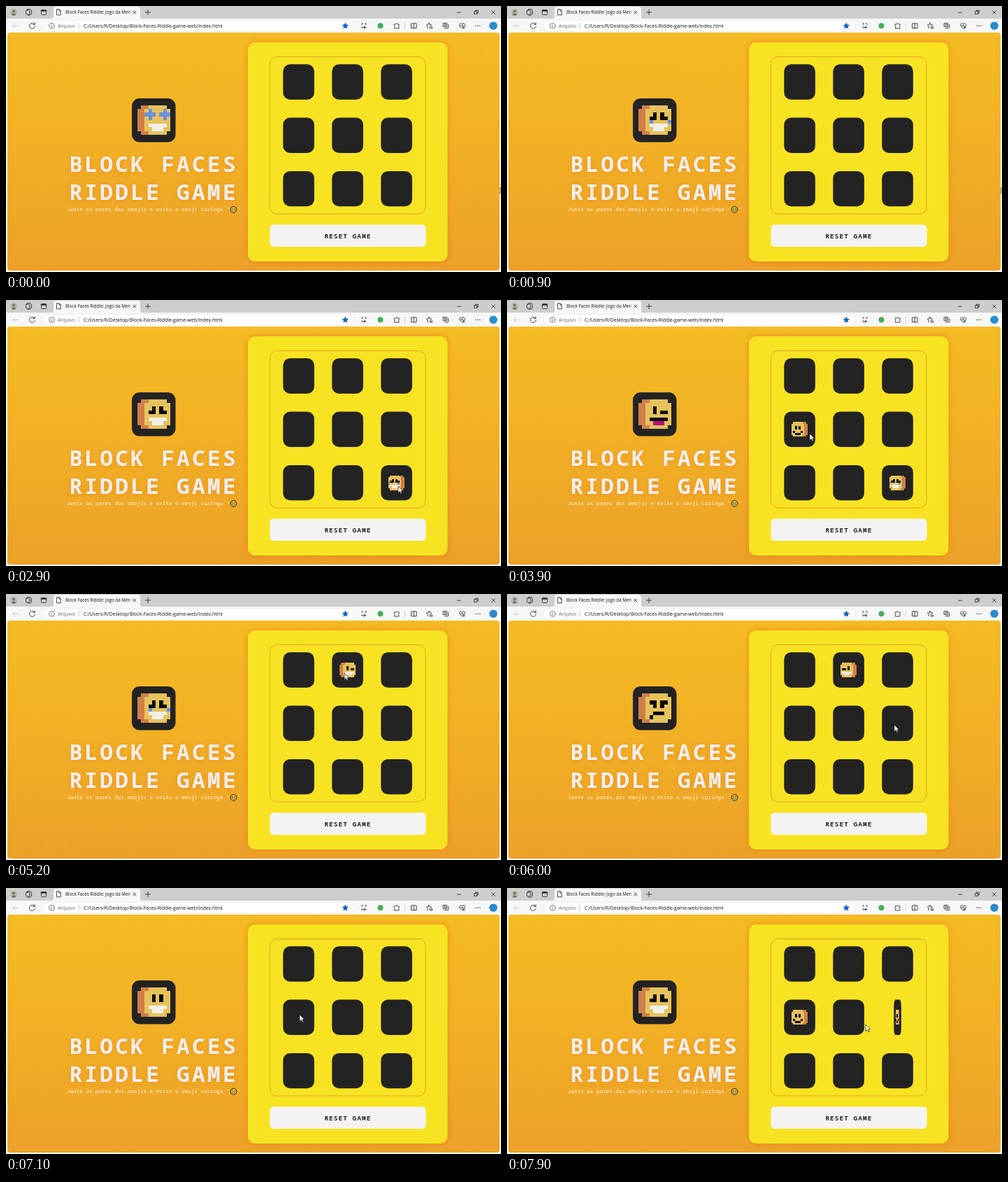
An HTML page for the animation above (8000 ms loop, 708 px wide and 380 px high).

```html
<!DOCTYPE html>
<html lang="pt">
<head>
<meta charset="utf-8">
<title>Block Faces Riddle</title>
<style>
html, body { margin: 0; width: 100%; height: 100%; overflow: hidden; background: #ececec; }
svg { display: block; width: 100vw; height: 100vh; }
.ui { font-family: "Open Sans", "Noto Sans", sans-serif; white-space: pre; }
.mono { font-family: "Noto Sans Mono", "DejaVu Sans Mono", monospace; white-space: pre; }
.title { font-size: 31px; font-weight: 600; letter-spacing: 3.36px; fill: #f3f0ec; }
.icon { fill: none; stroke: #333; stroke-width: .9; stroke-linecap: round; stroke-linejoin: round; }
</style>
</head>
<body>
<svg viewBox="0 0 708 380" xmlns="http://www.w3.org/2000/svg">
  <defs>
    <linearGradient id="sky" x1="0" y1="0" x2="0" y2="1">
      <stop offset="0" stop-color="#f4bb23"/>
      <stop offset=".45" stop-color="#f2b125"/>
      <stop offset="1" stop-color="#eca028"/>
    </linearGradient>
    <filter id="glow" x="-10%" y="-10%" width="120%" height="120%">
      <feDropShadow dx="0" dy="0" stdDeviation="4" flood-color="#ee7a1c" flood-opacity=".8"/>
    </filter>
    <filter id="soft" x="-10%" y="-30%" width="120%" height="160%">
      <feDropShadow dx="0" dy="1" stdDeviation="3" flood-color="#ea801e" flood-opacity=".6"/>
    </filter>
    <clipPath id="tabClip"><rect x="84" y="2" width="93.5" height="15"/></clipPath>
  </defs>

  <!-- browser frame -->
  <rect width="708" height="380" fill="#f7f7f7"/>
  <rect width="708" height="18" fill="#cdcdcd"/>
  <path d="M65 18q3 0 3-3V5q0-4 4-4h116q4 0 4 4v10q0 3 3 3z" fill="#f7f7f7"/>
  <circle cx="11" cy="9" r="5" fill="#b9b5a9"/>
  <circle cx="11" cy="7.4" r="1.9" fill="#77736a"/>
  <path d="M7.6 12.5q3.4-4.6 6.8 0q-3.4 2.4-6.8 0z" fill="#77736a"/>
  <g class="icon">
    <rect x="28.5" y="6" width="5.5" height="6" rx="1"/>
    <path d="M30.5 6V4.6h4.5l1.4 2v5L34 13.2h-3"/>
    <rect x="50.5" y="5.5" width="7" height="7" rx="1"/><path d="M50.5 6.7h7" stroke-width="2"/>
    <path d="M72.8 4.8h3.4l2 2v6h-5.4zM76 5v2h2"/>
    <path d="M181.8 7l4 4m0-4l-4 4M199.5 9h7m-3.5-3.5v7"/>
    <path d="M645.5 9.2h5M670 7.6h3.8v3.8H670zM671.5 7.3V6.2h3.8V10h-1.2M694.7 6.8l4.6 4.6m0-4.6l-4.6 4.6"/>
  </g>
  <text class="ui" x="85" y="11.4" font-size="6.3" fill="#111" clip-path="url(#tabClip)">Block Faces Riddle: Jogo da Memória</text>

  <rect x="52" y="20.2" width="446" height="16" rx="8" fill="#fff" stroke="#e2e2e2" stroke-width=".7"/>
  <path class="icon" d="M10 28.3h7.5M13 25.2l-3.1 3.1 3.1 3.1" style="stroke:#c9c9c9"/>
  <g class="icon">
    <path d="M40.9 26.1a4 4 0 1 0 .6 3M41.2 23.8v2.6h-2.6"/>
    <g style="stroke:#666"><circle cx="65.3" cy="28.3" r="3.8"/><path d="M65.3 28v2.2m0-4v.1"/></g>
    <path d="M104 24.5v7.5" style="stroke:#bbb"/>
    <path d="M509 26.5V25h1.5m3 0h1.5v1.5M509 29.5V31h1.5M513 28.5v4m-2-2h4"/>
    <path d="M555.5 26h2.2q.9-3 2.4 0h2v2.2q-2 .9 0 2.2v1.6h-6.6v-2q2-.8 0-2z"/>
    <path d="M570.5 23.5v9" style="stroke:#ccc"/>
    <path d="M582.2 25h-2.7v6.5h2.7M584.4 25h2.7v6.5h-2.7M583.3 24v8.6"/>
    <path d="M605 24.4l1.1 2.4 2.6.3-1.9 1.8M603.2 31.2l-.5.3.5-2.6-1.9-1.8 2.6-.3 1.1-2.4M606 30h4m-4 1.8h4"/>
    <path d="M625.5 24.5h5v5h-5zM627.3 31.6h5.3v-5.2M628 25.8v2.4m-1.2-1.2h2.4"/>
    <path d="M652.5 32l-3.6-3.6q-1.2-2.5 1-3.5 1.6-.5 2.6 1 1.2-1.5 2.8-1 2.2 1 .9 3.5zM650 28.3h1.8l.8-1.4 1 2.4h1.7"/>
    <path d="M672 28.3h.1m2.8 0h.1m2.8 0h.1" stroke-width="1.4"/>
  </g>
  <path d="M485.3 23.5l1.5 3 3.2.4-2.4 2.3.7 3.3-3-1.6-3 1.6.7-3.3-2.4-2.3 3.2-.4z" fill="#1364c4"/>
  <circle cx="535.5" cy="28.2" r="4" fill="#45ad5a"/>
  <circle cx="654.6" cy="30.8" r="1.8" fill="#3d9a4c"/>
  <circle cx="697" cy="28.2" r="5.8" fill="#2b8ccb"/>
  <g class="ui" font-size="6.95">
    <text x="74" y="30.8" fill="#666">Arquivo</text>
    <text x="111" y="30.8" fill="#111">C:/Users/R/Desktop/Block-Faces-Riddle-game-web/index.html</text>
  </g>

  <!-- page -->
  <rect x="2" y="38" width="704" height="340" rx="4" fill="url(#sky)"/>
  <rect x="180" y="132" width="62.5" height="62.5" rx="11" fill="#232323"/>
  <g id="hero" transform="translate(188 142) scale(5.23)"></g>
  <g class="mono title" filter="url(#soft)">
    <text x="90.4" y="237">BLOCK FACES</text>
    <text x="90.4" y="277">RIDDLE GAME</text>
  </g>
  <g class="mono" font-size="7.2" font-weight="500" letter-spacing=".25" fill="#fdf4e2">
    <text x="87" y="293.3">Junte os pares dos emojis e evite o emoji curinga "</text>
    <text x="331.3" y="293.3">"</text>
  </g>
  <circle cx="325.5" cy="290.8" r="4.4" fill="#f3c93a" stroke="#2a2418" stroke-width="1"/>
  <path d="M323.8 288.4v1.4m3.4-1.4v1.4" stroke="#2a2418" stroke-width="1.1"/>
  <path d="M322.8 291.2h5.4q-2.7 4.6-5.4 0z" fill="#fff" stroke="#2a2418" stroke-width=".7"/>

  <rect x="346" y="52" width="285.5" height="313" rx="10" fill="#f7e321" filter="url(#glow)"/>
  <rect x="377.5" y="72.5" width="222.5" height="224.5" rx="10" fill="none" stroke="#eda01f"/>
  <g id="board"></g>
  <rect x="377.5" y="312.5" width="223" height="31.5" rx="5" fill="#f3f3f3"/>
  <text class="mono" x="455.4" y="331.8" font-size="9.5" font-weight="600" letter-spacing="1" fill="#222">RESET GAME</text>
  <path id="cursor" d="M0 0V9.4L2.2 7.4 3.8 10.8 5.3 10.1 3.8 6.8H6.7Z" fill="#fff" stroke="#222" stroke-width=".7"/>
</svg>

<script>
const LOOP = 8000, STEP = 100, FLIP = 300;
const $ = id => document.getElementById(id);

// Each mark is a column and row on the 9 by 8 face.
const BLACK = '#0c0a08', WHITE = '#f1efea', BLUE = '#6b90de', PINK = '#b80f86';
const TEETH = '35 45 55 65 75 46 56 66';
const EYES = '42 43 62 63', WINK = '42 43 63 73', ARCHED = '42 33 43 62 63 73';
const FACES = {
  star: { [BLUE]: '31 22 32 42 33 71 62 72 82 73', [WHITE]: TEETH },
  grin: { [BLACK]: EYES, [WHITE]: TEETH },
  wink: { [BLACK]: WINK, [WHITE]: TEETH },
  arch: { [BLACK]: ARCHED, [WHITE]: TEETH },
  cry: { [BLACK]: ARCHED, [BLUE]: '34 84', [WHITE]: TEETH },
  smile: { [BLACK]: EYES + ' 35 75 46 56 66' },
  tongue: { [BLACK]: WINK + ' 35 45 55 65 75', [PINK]: '46 56 66' },
  doubt: { [BLACK]: '32 42 43 62 72 63 45 55 65 36' }
};
const MOODS = ('star grin cry star smile wink arch smile tongue ' +
  'grin cry smile doubt star grin wink arch').split(' ');

// column, row, face, opening time, closing time
const TURNS = [
  [2, 2, 'cry', 2600, 4200],
  [0, 1, 'smile', 3650, 4200],
  [1, 0, 'wink', 5200, 6700],
  [2, 1, 'smile', 6050, 6700],
  [0, 1, 'smile', 7250, 9000],
  [2, 1, 'smile', 7800, 9000]
];

// time, x, y
const MOVES = [
  [0, 707, 259], [1600, 707, 259], [2000, 588, 290], [2400, 561, 266],
  [2900, 561, 266], [3400, 433, 191], [4500, 433, 191], [5000, 484, 113],
  [5200, 484, 113], [5500, 554, 187], [6600, 554, 187], [7050, 420, 181],
  [7200, 420, 181], [7600, 547, 190], [7700, 547, 190], [7900, 513, 195]
];

const cells = marks => marks.split(' ').map(([x, y]) => `M${x} ${y}h1v1h-1z`).join('');

function faceMarkup(name) {
  const marks = Object.entries(FACES[name])
    .map(([color, list]) => `<path fill="${color}" d="${cells(list)}"/>`).join('');
  return '<g shape-rendering="crispEdges">' +
    '<path fill="#e6c25c" d="M1 0h7v1h1v6h-1v1h-7v-1h-1v-6h1z"/>' +
    '<path fill="#cf8049" d="M1 0h2v1h-1v6h1v1h-2v-1h-1v-6h1z"/>' + marks + '</g>';
}

// CSS "ease": cubic-bezier(.25, .1, .25, 1)
function ease(p) {
  if (p <= 0 || p >= 1) return p <= 0 ? 0 : 1;
  const bez = (a, b, s) => 3 * a * s * (1 - s) ** 2 + 3 * b * s * s * (1 - s) + s ** 3;
  let lo = 0, hi = 1;
  for (let i = 0; i < 24; i++) {
    const mid = (lo + hi) / 2;
    if (bez(.25, .25, mid) < p) lo = mid; else hi = mid;
  }
  return bez(.1, 1, lo);
}

const tiles = [];
for (let row = 0; row < 3; row++) {
  for (let col = 0; col < 3; col++) {
    const node = document.createElementNS('http://www.w3.org/2000/svg', 'g');
    node.innerHTML = '<rect x="-22.3" y="-25.2" width="44.6" height="50.4" rx="10" fill="#232323"/>' +
      '<g transform="translate(-11.8 -10.5) scale(2.63)"></g>';
    $('board').append(node);
    tiles.push({ node, col, row, x: 418.6 + col * 70, y: 108.5 + row * 76.3, face: '' });
  }
}

function drawTile(tile, t) {
  const turn = TURNS.findLast(([c, r, , open]) => c === tile.col && r === tile.row && t >= open);
  let face = '', angle = 0;
  if (turn) {
    const [, , name, open, close] = turn;
    face = t < close ? name : '';
    angle = Math.PI * (ease((t - open) / FLIP) - ease((t - close) / FLIP));
  }
  if (face !== tile.face) {
    tile.node.lastChild.innerHTML = face && faceMarkup(face);
    tile.face = face;
  }
  tile.node.setAttribute('transform',
    `translate(${tile.x} ${tile.y}) scale(${Math.cos(angle).toFixed(4)} 1)`);
}

function cursorAt(t) {
  const i = MOVES.findIndex(([time]) => time > t);
  if (i < 0) return MOVES[MOVES.length - 1].slice(1);
  const [t0, x0, y0] = MOVES[i - 1], [t1, x1, y1] = MOVES[i];
  const p = (t - t0) / (t1 - t0), k = p * p * (3 - 2 * p);
  return [x0 + (x1 - x0) * k, y0 + (y1 - y0) * k];
}

let mood = '';
function draw(time) {
  const t = Math.floor(time % LOOP / STEP) * STEP;
  const next = MOODS[Math.floor((t + 200) / 500)];
  if (next !== mood) $('hero').innerHTML = faceMarkup(mood = next);
  tiles.forEach(tile => drawTile(tile, t));
  $('cursor').setAttribute('transform', `translate(${cursorAt(t).join(' ')})`);
}

const start = performance.now();
function tick() {
  draw(performance.now() - start);
  requestAnimationFrame(tick);
}
tick();
</script>
</body>
</html>
```
